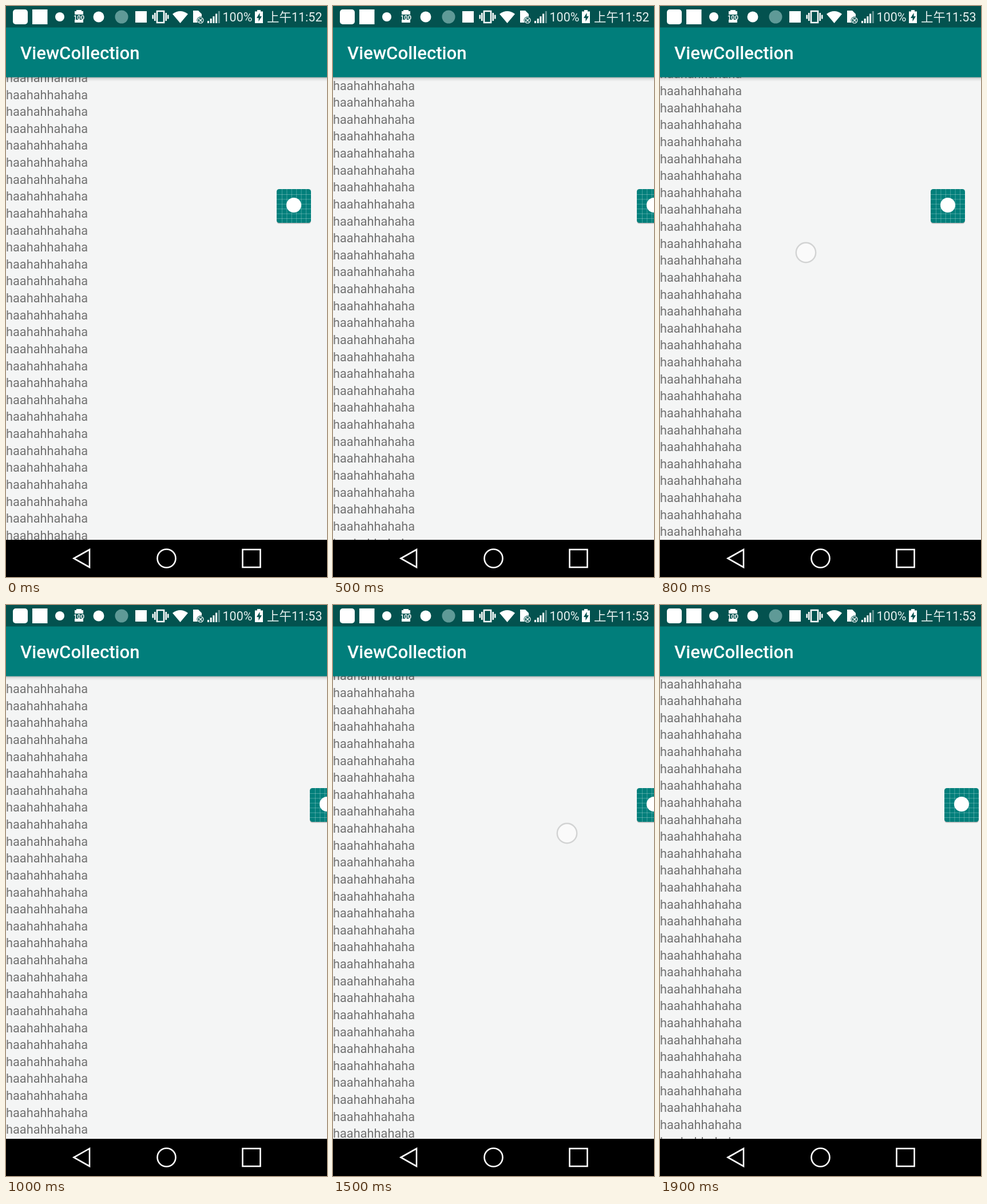
Recreate the animation shown at these times as an HTML page. Size 561 by 998 pixels, loop 2 s.

```html
<!DOCTYPE html>
<html lang="en">
<head>
<meta charset="utf-8">
<title>ViewCollection</title>
<style>
  html, body { margin: 0; width: 100%; height: 100%; overflow: hidden; background: #f4f5f5; }
  svg { display: block; width: 100vw; height: 100vh; font-family: Roboto, "Noto Sans CJK SC", "Noto Sans CJK", sans-serif; }
  #list { font-size: 21.8px; fill: #737373; }
  .status { font-size: 21.5px; fill: #e6f0ef; }
  .line { fill: none; stroke: #fff; stroke-width: 2.6; }
</style>
</head>
<body>
<svg viewBox="0 0 561 998">
  <defs>
    <linearGradient id="shade" x2="0" y2="1">
      <stop offset="0" stop-color="#000" stop-opacity=".3"/>
      <stop offset=".4" stop-color="#000" stop-opacity=".09"/>
      <stop offset="1" stop-color="#000" stop-opacity="0"/>
    </linearGradient>
  </defs>
  <rect width="561" height="998" fill="#f4f5f5"/>
  <g id="list"></g>

  <g id="button">
    <rect y="1.5" width="60" height="59" rx="4.5" fill="#000" opacity=".25"/>
    <rect width="60" height="59" rx="4.5" fill="#017f7b"/>
    <path id="grid" fill="none" stroke="#fff" stroke-opacity=".28"/>
    <circle cx="30" cy="28" r="13" fill="#fff"/>
  </g>
  <circle id="touch" r="17.2" fill="#fafafa" stroke="#d2d3d3" stroke-width="2.4"/>

  <rect y="124" width="561" height="8" fill="url(#shade)"/>
  <rect y="37" width="561" height="87.5" fill="#017e7b"/>
  <text x="25" y="93" font-size="31.2" font-weight="500" fill="#fff">ViewCollection</text>

  <rect width="561" height="37.5" fill="#03524f"/>
  <g fill="#fff">
    <rect x="12" y="6" width="26" height="26" rx="5"/>
    <rect x="46" y="6" width="26.5" height="26"/>
    <circle cx="94" cy="19" r="8"/>
    <path d="M123 7h9v2h3v6h-15v-6h3zM120 24h15v5h-15z"/>
    <text x="127.5" y="23.5" font-size="11" font-weight="700" text-anchor="middle">100</text>
    <circle cx="162" cy="19" r="9.5"/>
    <circle cx="202" cy="19" r="11.5" fill="#5f9a97"/>
    <rect x="226" y="9" width="20" height="20"/>
    <path class="line" d="M264 9h12v20h-12zM260.300 12v14M279.700 12v14M256.800 15.500v7M283.200 15.500v7"/>
    <path d="M291 14Q304.500 4 318 14L304.500 30Z"/>
    <path d="M327 8h9l6 6v15h-15z"/>
    <circle cx="340" cy="25" r="6.500" fill="#03524f"/>
    <path d="M337.500 22.500l5 5m0-5l-5 5" stroke="#fff" stroke-width="1.500"/>
    <circle cx="340" cy="25" r="5" fill="none" stroke="#fff" stroke-width="1.200"/>
    <path d="M352 26h3v4h-3zM356.700 22h3v8h-3zM361.400 18h3v12h-3zM366.100 13.500h3v16.500h-3z"/>
    <path d="M370.800 9h3v21h-3z" opacity=".4"/>
    <path d="M439 7h6v2.500h4v20.500h-14v-20.500h4z"/>
    <path d="M443.500 12l-5.500 9h3.500v6l5.500-9h-3.500z" fill="#03524f"/>
  </g>
  <text class="status" x="378.500" y="27">100%</text>
  <text id="clock" class="status" x="552.500" y="27" text-anchor="end"></text>

  <rect y="933" width="561" height="65"/>
  <path class="line" d="M118.500 965.500L146 950V981Z"/>
  <circle class="line" cx="280.500" cy="965.500" r="16"/>
  <rect class="line" x="413.500" y="950" width="31" height="31"/>
</svg>
<script>
const $ = id => document.getElementById(id);
const LOOP = 2000, STEP = 100, PITCH = 29.63;
const SHOWN = 473, HIDDEN = 531;
const rows = (count, extra) => count * PITCH + extra;

// Keyframes are [time in ms, value].
const scrollKeys = [
  [200, 0], [500, rows(9, 16)], [700, rows(12, 6.5)], [800, rows(12, 6.5)],
  [1000, rows(7, 8.5)], [1100, rows(7, 7.5)], [1300, rows(7, 7.5)],
  [1500, rows(9, 1.5)], [1800, rows(13, 17)]
];
const buttonKeys = [
  [300, SHOWN], [500, HIDDEN], [600, HIDDEN], [800, SHOWN], [1000, HIDDEN],
  [1200, HIDDEN], [1300, SHOWN], [1500, HIDDEN], [1800, HIDDEN], [1900, 497]
];
const drags = [
  { start: 800, end: 900, from: [255, 431], to: [262, 540] },
  { start: 1400, end: 1500, from: [415, 480], to: [409, 399] }
];

const mix = (a, b, k) => a + (b - a) * k;

function valueAt(keys, t) {
  const next = keys.findIndex(([time]) => time > t);
  if (next === 0) return keys[0][1];
  if (next < 0) return keys.at(-1)[1];
  const [t0, a] = keys[next - 1], [t1, b] = keys[next];
  return mix(a, b, (t - t0) / (t1 - t0));
}

function build() {
  let lines = "", grid = "";
  for (let i = -1; i < 28; i++) lines += `<text y="${162.5 + i * PITCH}">haahahhahaha</text>`;
  for (let p = 9.5; p < 59; p += 8.4) grid += `M${p} 0V59M0 ${p}H60`;
  $("list").innerHTML = lines;
  $("grid").setAttribute("d", grid);
}

function draw(t) {
  const scroll = valueAt(scrollKeys, t) % PITCH;
  $("list").setAttribute("transform", `translate(0 ${-scroll})`);
  $("button").setAttribute("transform", `translate(${valueAt(buttonKeys, t)} 320)`);
  $("clock").textContent = t < 700 ? "上午11:52" : "上午11:53";

  const drag = drags.find(d => t >= d.start && t <= d.end);
  $("touch").setAttribute("visibility", drag ? "visible" : "hidden");
  if (drag) {
    const k = (t - drag.start) / (drag.end - drag.start);
    const [x, y] = drag.from.map((v, i) => mix(v, drag.to[i], k));
    $("touch").setAttribute("transform", `translate(${x} ${y})`);
  }
}

function tick() {
  draw(Math.floor(performance.now() % LOOP / STEP) * STEP);
  requestAnimationFrame(tick);
}

build();
tick();
</script>
</body>
</html>
```
